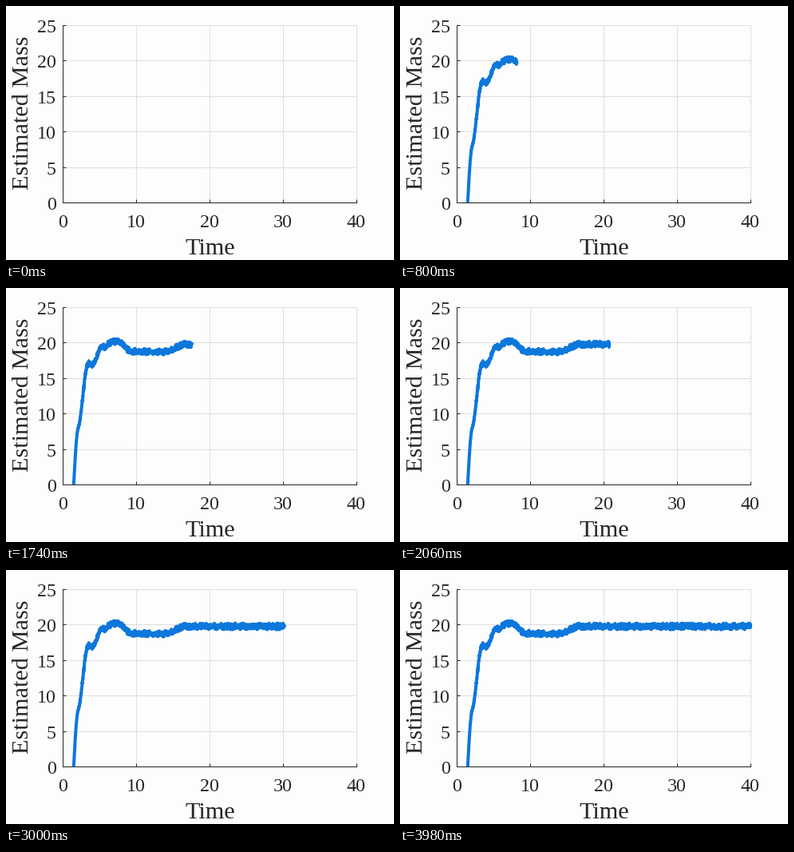
Write a matplotlib script that moves like this. It is 486 by 318 pixels and loops after 4000 ms.

```python
import matplotlib.pyplot as plt
import numpy as np
from matplotlib.animation import FuncAnimation

W, H, DPI = 486, 318, 96
PX = 72 / DPI                      # one pixel in points
LEFT, RIGHT, TOP, BASE = 71, 439, 24, 246
T_MAX, M_MAX = 40, 25
FRAMES, STEP_MS = 200, 20
START, NOISE = 1.5, 0.2
PAPER, GRID, INK, BLUE = "#fdfdfd", "#dedede", "#262626", "#0d77dc"


def progress(t, start, end):
    return np.clip((t - start) / (end - start), 0, 1)


def smooth(t, start, end):
    u = progress(t, start, end)
    return u * u * (3 - 2 * u)


def mass_signal():
    """Fast rise, overshoot and settling, with bounded noise."""
    rng = np.random.default_rng(7)
    t = np.arange(START, T_MAX + 0.01, 0.02)
    mass = 8 * np.sin(np.pi / 2 * progress(t, START, 2.15))
    mass += 9 * smooth(t, 2.05, 3.45)
    mass += 2.4 * smooth(t, 4.1, 5.3)
    mass += 0.8 * smooth(t, 5.6, 6.8)
    mass -= 1.45 * smooth(t, 7.4, 9.4)
    mass += smooth(t, 14.2, 16.6)
    noise = np.clip(rng.standard_normal(t.size), -2.2, 2.2)
    return t, mass + NOISE * progress(t, START, 3) * noise


def label(x, y, text, size, **kw):
    """Text with its baseline at a pixel position from the top left."""
    fig.text(x / W, 1 - y / H, text, fontsize=size * PX, color=INK,
             family="Liberation Serif", va="baseline", **kw)


fig = plt.figure(figsize=(W / DPI, H / DPI), dpi=DPI, facecolor=PAPER)
ax = fig.add_axes([LEFT / W, 1 - BASE / H, (RIGHT - LEFT) / W, (BASE - TOP) / H],
                  facecolor=PAPER)
ax.set(xlim=(0, T_MAX), ylim=(0, M_MAX),
       xticks=range(0, T_MAX + 1, 10), yticks=range(0, M_MAX + 1, 5))
ax.set_axisbelow(True)
ax.grid(color=GRID, lw=PX, clip_on=False)
ax.tick_params(direction="in", length=4 * PX, width=PX, color=INK,
               labelbottom=False, labelleft=False)
ax.spines[["top", "right"]].set_visible(False)
for side in ("left", "bottom"):
    ax.spines[side].set(color=INK, linewidth=PX)

for v in range(0, T_MAX + 1, 10):
    label(LEFT + (RIGHT - LEFT) * v / T_MAX - 0.2, 277, str(v), 24, ha="center")
for v in range(0, M_MAX + 1, 5):
    label(63, BASE - (BASE - TOP) * v / M_MAX + 9, str(v), 24, ha="right")
label((LEFT + RIGHT) / 2 + 0.5, 311, "Time", 30.2, ha="center")
label(28, (TOP + BASE) / 2 - 1, "Estimated Mass", 30.2, ha="center", rotation=90,
      rotation_mode="anchor")

time, mass = mass_signal()
line, = ax.plot([], [], color=BLUE, lw=4 * PX, solid_capstyle="butt",
                solid_joinstyle="round", clip_on=False)


def update(i):
    n = np.searchsorted(time, (i + 1) * T_MAX / FRAMES + 1e-6)
    line.set_data(time[:n], mass[:n])
    return line,


anim = FuncAnimation(fig, update, frames=FRAMES, interval=STEP_MS,
                     init_func=lambda: update(0), repeat=True, repeat_delay=0)
plt.show()
```
